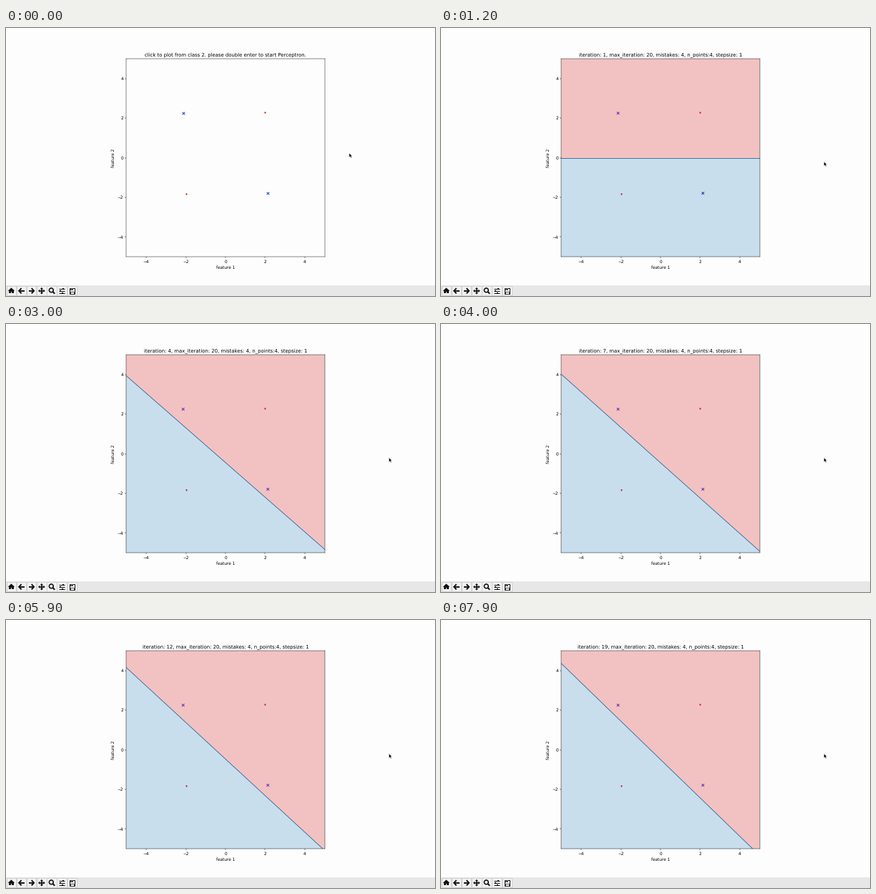
A matplotlib script for the animation above (8 s loop, 600 by 375 pixels).

```python
import numpy as np
import matplotlib.pyplot as plt
from matplotlib.animation import FuncAnimation
from matplotlib.patches import Circle, Polygon, Rectangle

K = 5 / 12        # scale of the default plot style on this stage
PX = 0.72         # points per pixel at 100 dpi
STEP = 100        # ms per frame
PASSES = 19
PAPER, PINK, SKY = "#fdfdfe", "#f2c2c2", "#c8deed"
INK = "#111111"

plt.rcParams.update({
    "font.family": "DejaVu Sans",
    "text.hinting": "none",
    "font.size": 10 * K,
    "axes.titlesize": 11.88 * K,
    "axes.titlepad": 6 * K,
    "axes.labelpad": 4 * K,
    "axes.linewidth": 0.8 * K,
    "toolbar": "None",
})
for axis in ("xtick", "ytick"):
    plt.rcParams.update({
        f"{axis}.major.size": 3.5 * K,
        f"{axis}.major.pad": 3.5 * K,
        f"{axis}.major.width": 0.8 * K,
    })

RED_PTS = np.array([(1.97, 2.309), (-1.97, -1.8345)])
BLUE_PTS = np.array([(-2.14, 2.25), (2.14, -1.79)])


def train(passes):
    """Online perceptron; returns (weights, mistakes) after each pass."""
    data = [(p, 1) for p in RED_PTS] + [(p, -1) for p in BLUE_PTS]
    w, history = np.zeros(3), []
    for _ in range(passes):
        mistakes = 0
        for point, label in data:
            x = np.append(point, 1)
            if label * (w @ x) <= 0:
                w = w + label * x
                mistakes += 1
        history.append((w, mistakes))
    return history


def passes_done(now):
    """Slow first passes settle into a steady rhythm."""
    n = np.arange(1, PASSES + 1)
    finish = 1823 + 322 * n - 945 * 0.6 ** (n - 1)
    return int(np.sum(finish < now + STEP / 2))


history = train(PASSES)
fig = plt.figure(figsize=(6, 3.75), dpi=100, facecolor=PAPER)

# Window layer in pixel coordinates
win = fig.add_axes([0, 0, 1, 1])
win.set(xlim=(0, 600), ylim=(375, 0))
win.axis("off")


def stroke(xs, ys, width=1.3):
    win.plot(xs, ys, color=INK, lw=width * PX, solid_capstyle="butt",
             solid_joinstyle="miter")


def box(x, y, w, h, color, edge="none", width=0.5):
    win.add_patch(Rectangle((x, y), w, h, fc=color, ec=edge, lw=width * PX))


def triangle(tip, direction, length, half):
    tip, d = np.array(tip), np.array(direction)
    base, side = tip - length * d, half * d[::-1]
    win.add_patch(Polygon([tip, base + side, base - side], fc=INK, ec="none"))


def home(x, y):
    triangle((x, y - 4.4), (0, -1), 4.4, 4.8)
    box(x - 3.2, y - 0.5, 2.3, 4, INK)
    box(x + 0.9, y - 0.5, 2.3, 4, INK)
    box(x - 1, y - 0.5, 2, 1.5, INK)


def arrow(x, y, direction):
    tip = x + 4 * direction
    stroke([x - 4 * direction, tip - direction], [y, y], 1.9)
    stroke([x, tip - 0.6 * direction, x], [y - 3.7, y, y + 3.7], 1.9)


def pan(x, y):
    stroke([x - 3.5, x + 3.5], [y, y], 1.7)
    stroke([x, x], [y - 3.5, y + 3.5], 1.7)
    for dx, dy in ((1, 0), (-1, 0), (0, 1), (0, -1)):
        triangle((x + 4.8 * dx, y + 4.8 * dy), (dx, dy), 2.2, 2.2)


def zoom(x, y):
    win.add_patch(Circle((x - 0.7, y - 0.9), 2.9, fc="none", ec=INK,
                         lw=1.6 * PX))
    stroke([x + 1.3, x + 4.2], [y + 1.1, y + 4], 2)


def sliders(x, y):
    for row, knob in ((-3, 1.5), (0, -2), (3, 0.5)):
        stroke([x - 4.2, x + 4.2], [y + row, y + row], 1)
        box(x + knob - 0.9, y + row - 1.1, 1.8, 2.2, INK)


def save(x, y):
    box(x - 3.8, y - 3.8, 7.6, 7.6, "#f4f4f4", INK, 1)
    box(x - 2.2, y - 3.5, 4, 2.2, "#555555")
    box(x - 2.2, y + 0.8, 4.4, 3, "#f4f4f4", INK, 0.7)


def toolbar():
    box(0, 360, 600, 15, "#e7e7e7")
    icons = [home, lambda x, y: arrow(x, y, -1),
             lambda x, y: arrow(x, y, 1), pan, zoom, sliders, save]
    for i, icon in enumerate(icons):
        x = 7.4 + 14.15 * i
        box(x - 6.7, 361.2, 13.4, 13.2, "#f1f1f1", "#c8c8c8", 0.7)
        icon(x, 367.8)


toolbar()

CURSOR = np.array([(0, 0), (0, 6), (1.4, 4.8), (2.4, 7), (3.5, 6.5),
                   (2.5, 4.4), (4.3, 4.4)])
cursor = win.add_patch(Polygon(CURSOR, fc="black", ec="white", lw=0.3))

# Plot
SIDE = 277.2
ax = fig.add_axes([168.4 / 600, 54.8 / 375, SIDE / 600, SIDE / 375])
ax.set(xlim=(-5, 5), ylim=(-5, 5), xlabel="feature 1", ylabel="feature 2")
ax.set_xticks(range(-4, 5, 2))
ax.set_yticks(range(-4, 5, 2))
title = ax.set_title("")
below = ax.add_patch(Polygon([(0, 0)] * 4, fc=SKY, ec="none"))
line, = ax.plot([], [], color="#2a6a9f", lw=1.5 * K)
dots = ax.scatter(*RED_PTS.T, marker=".", s=36 * K**2, lw=0.8 * K, zorder=3)
crosses = ax.scatter(*BLUE_PTS.T, marker="x", s=40 * K**2, lw=1.7 * K,
                     zorder=3)


def draw(frame):
    now = frame * STEP
    n = passes_done(now)
    cursor.set_xy(CURSOR + ((480, 175) if now < 100 else (535.6, 187)))
    line.set_visible(n > 0)
    below.set_visible(n > 0)
    if n == 0:
        title.set_text("click to plot from class 2. please double enter "
                       "to start Perceptron.")
        ax.set_facecolor(PAPER)
        dots.set_color("#d02a1c")
        crosses.set_color("#1f45cc")
        return

    (w1, w2, bias), mistakes = history[n - 1]
    title.set_text(f"iteration: {n}, max_iteration: 20, mistakes: {mistakes}, "
                   "n_points:4, stepsize: 1")
    xs = np.array([-5, 5])
    ys = -(w1 * xs + bias) / w2
    line.set_data(xs, ys)
    below.set_xy([(-5, -9), (-5, ys[0]), (5, ys[1]), (5, -9)])
    ax.set_facecolor(PINK)
    dots.set_color("#bc2a30")
    above = BLUE_PTS[:, 1] > np.interp(BLUE_PTS[:, 0], xs, ys)
    crosses.set_color(["#6434bc" if up else "#2a34c0" for up in above])


anim = FuncAnimation(fig, draw, frames=80, interval=STEP, repeat=True,
                     repeat_delay=0, blit=False)
plt.show()
```
